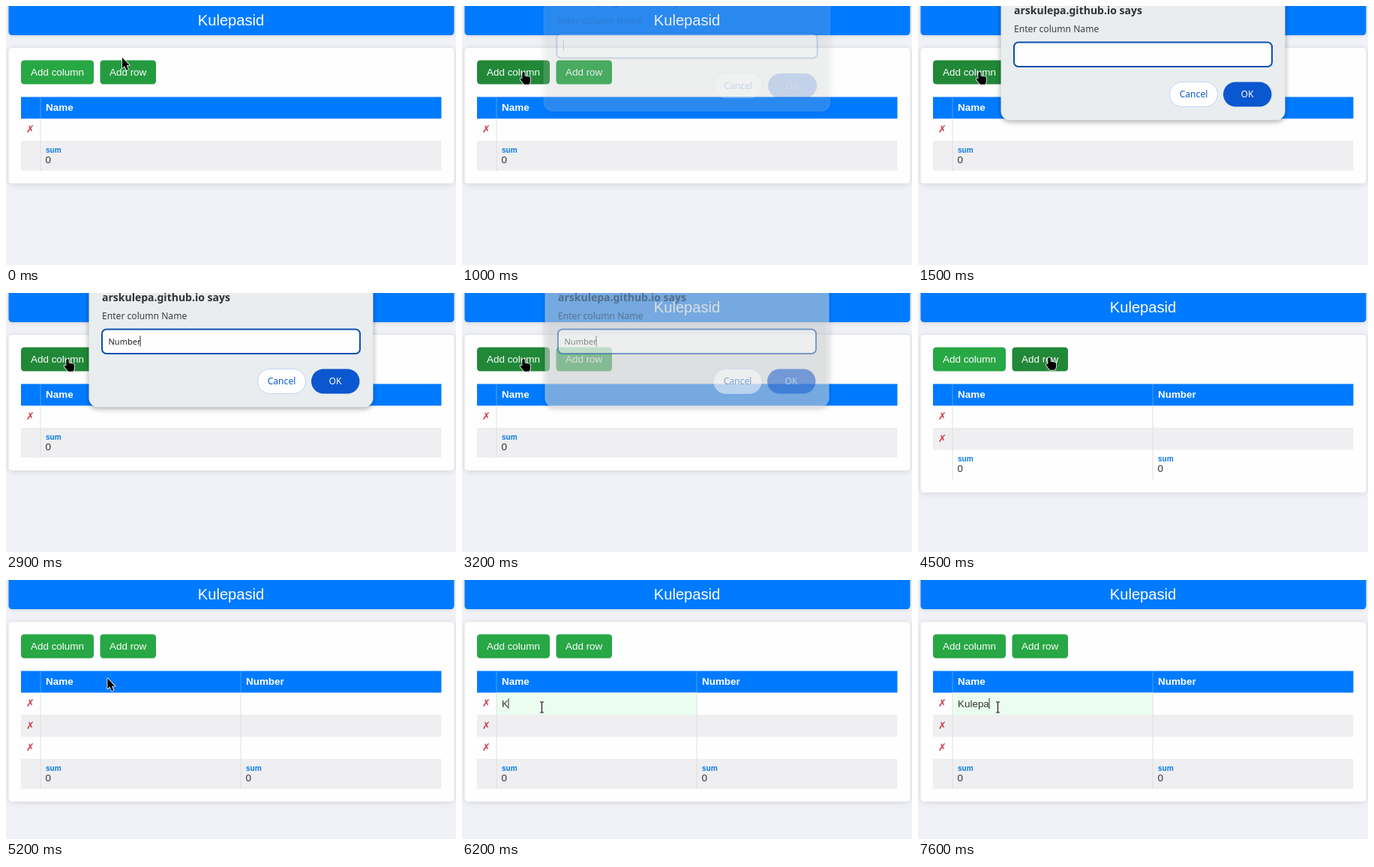
These frames come from a looping animation (600 px wide and 346 px high, 8000 ms). An HTML page with a canvas:

```html
<!DOCTYPE html>
<html lang="en">
<head>
<meta charset="utf-8">
<title>Table editor</title>
<style>
  html, body { margin: 0; width: 100%; height: 100%; overflow: hidden; background: #f1f2f7; }
  canvas { display: block; width: 600px; height: 346px; }
</style>
</head>
<body>
<canvas id="stage"></canvas>
<script>
const W = 600, H = 346, LOOP = 8000, STEP = 100;
const SANS = '"Liberation Sans", Arial, sans-serif';
const UI = '"Noto Sans", sans-serif';
const MARK = '"DejaVu Sans", sans-serif';
const BASE = 13.44;

const canvas = document.getElementById('stage');
const ctx = canvas.getContext('2d');
const dpr = window.devicePixelRatio || 1;
canvas.width = W * dpr;
canvas.height = H * dpr;

const buttons = {
  column: { x: 20, y: 72.5, w: 97, h: 32, label: 'Add column', tx: 33 },
  row: { x: 125.5, y: 72.5, w: 74.5, h: 32, label: 'Add row', tx: 138 }
};

const pathX = [[0, 155], [200, 146], [500, 112], [700, 90], [900, 82],
  [3500, 82], [3700, 108], [4000, 175], [4900, 175], [5100, 150], [5400, 106]];
const pathY = [[0, 69], [200, 82], [500, 95], [700, 94], [900, 88],
  [3500, 88], [3700, 92], [4000, 86], [4900, 86], [5100, 112], [5400, 170]];
const hoverColumn = [[500, 0], [800, 1], [3600, 1], [3900, 0]];
const hoverRow = [[0, 0.4], [200, 0.9], [300, 0.9], [600, 0],
  [3800, 0], [4100, 1], [4900, 1], [5200, 0]];
const dialogFade = [[950, 0], [1230, 1], [3100, 1], [3300, 0]];
const dialogDrop = [[1000, 1], [1300, 0]];

const numberKeys = [2100, 2300, 2500, 2700, 2800, 2900];
const nameKeys = [6200, 7200, 7400, 7600, 7600, 7600];

const arrow = new Path2D('M0 0V14L3.2 11.2L5.5 16.8L8 15.8L5.7 10.3H9.8Z');
const hand = new Path2D('M-1.7 1.2Q0 -1 1.7 1.2V5.6L7.4 6.6Q9.3 7 9.2 9V12.5L7.8 16.8H0.8L-4 10.8Q-4.8 8.6 -2.8 8.6L-1.7 9.6Z');
const beam = new Path2D('M-2.5 -7H2.5M0 -7V7M-2.5 7H2.5');

function key(t, points) {
  if (t <= points[0][0]) return points[0][1];
  for (let i = 1; i < points.length; i++) {
    const [t1, v1] = points[i], [t0, v0] = points[i - 1];
    if (t <= t1) return v0 + (v1 - v0) * (t - t0) / (t1 - t0);
  }
  return points[points.length - 1][1];
}

const typed = (t, word, times) => word.slice(0, times.filter(k => k <= t).length);

function rect(x, y, w, h, color) {
  ctx.fillStyle = color;
  ctx.fillRect(x, y, w, h);
}

function round(x, y, w, h, r, fill, stroke, line) {
  ctx.beginPath();
  ctx.roundRect(x, y, w, h, r);
  ctx.fillStyle = fill;
  ctx.fill();
  if (stroke) {
    ctx.shadowColor = 'transparent';
    ctx.strokeStyle = stroke;
    ctx.lineWidth = line;
    ctx.stroke();
  }
}

function shadowed(blur, dy, color, draw) {
  ctx.save();
  ctx.shadowBlur = blur * dpr;
  ctx.shadowOffsetY = dy * dpr;
  ctx.shadowColor = color;
  draw();
  ctx.restore();
}

// Draws a line of text and returns its width.
function text(str, x, y, size, color, family = SANS, weight = 400, align = 'left') {
  ctx.font = `${weight} ${size}px ${family}`;
  ctx.textAlign = align;
  ctx.fillStyle = color;
  ctx.fillText(str, x, y);
  return ctx.measureText(str).width;
}

function drawButton(b, hover) {
  const mix = (a, z) => Math.round(a + (z - a) * hover);
  round(b.x, b.y, b.w, b.h, 4.2, `rgb(${mix(40, 33)},${mix(167, 136)},${mix(69, 56)})`);
  text(b.label, b.tx, 93, BASE, '#fff');
}

function drawTable(t) {
  const rows = 1 + (t >= 4300) + (t >= 4800);
  const two = t >= 3300;
  const columns = two ? [[53, 'Name'], [320, 'Number']] : [[53, 'Name']];
  const lines = two ? [45.5, 312.5] : [45.5];
  const sumY = 150.5 + rows * 29.5;
  const bottom = sumY + 40;

  shadowed(8, 1, 'rgba(0,0,0,.13)', () => round(3.5, 56, 594, bottom + 17 - 56, 4.5, '#fefefe'));
  drawButton(buttons.column, key(t, hoverColumn));
  drawButton(buttons.row, key(t, hoverRow));

  rect(20, 121.5, 560.5, 29, '#007bff');
  for (let i = 0; i <= rows; i++) {
    const y = 150.5 + i * 29.5;
    if (i % 2) rect(20, y, 560.5, i === rows ? 40 : 29.5, '#efeff1');
    if (i < rows) text('✗', 32.5, y + 18.5, BASE, '#cf3f4e', MARK, 700, 'center');
  }
  if (t >= 6200) rect(46, 150.5, 267, 29.5, '#ebfdee');

  for (const x of lines) {
    rect(x, 121.5, 1, 29, 'rgba(222,226,230,.35)');
    rect(x, 150.5, 1, bottom - 150.5, '#dddfe2');
  }
  for (const [x, label] of columns) {
    text(label, x, 140, BASE, '#fff', SANS, 700);
    text('sum', x, sumY + 15.5, 10.08, '#0a7aec', SANS, 700);
    text('0', x - 0.5, sumY + 29.5, BASE, '#333');
  }

  if (t >= 6200) {
    const w = text(typed(t, 'Kulepa', nameKeys), 53, 169.5, BASE, '#333');
    if (t < 6500 || t >= 7000) rect(Math.round(53 + w) - 0.5, 158, 1, 14, '#333');
  }
}

function drawDialog(t) {
  const alpha = key(t, dialogFade);
  if (t < 1000 || alpha <= 0) return;
  const drop = key(t, dialogDrop);
  ctx.save();
  ctx.globalAlpha = alpha;
  ctx.translate(300, -11.5 * drop);
  ctx.scale(1 + 0.01 * drop, 1);
  ctx.translate(-300, 0);

  shadowed(7, 2, 'rgba(0,0,0,.35)', () => round(110.5, -40, 379, 192.5, 12, '#e9edef'));
  text('arskulepa.github.io says', 128, 11, 14, '#303235', UI, 600);
  text('Enter column Name', 128, 35, 12.1, '#3b3d40', UI);

  round(128, 48.5, 344, 32.5, 6, '#fefefe', '#0b50b0', 2);
  const w = text(typed(t, 'Number', numberKeys), 136.5, 68.5, 11, '#222', UI);
  if (t < 1500 || t >= 2000) rect(Math.round(136.5 + w) - 0.5, 57, 1, 14.5, '#222');

  round(335.5, 101.5, 64, 33, 16.5, '#fefefe', '#c2d5f3', 1);
  text('Cancel', 367.5, 122.3, 12.1, '#0b57d0', UI, 500, 'center');
  round(407, 101.5, 64.5, 33, 16.5, '#0b57d0');
  text('OK', 439, 122.3, 12.1, '#fff', UI, 500, 'center');
  ctx.restore();
}

function drawCursor(t) {
  const x = key(t, pathX), y = key(t, pathY);
  const over = b => x >= b.x && x <= b.x + b.w && y >= b.y && y <= b.y + b.h;
  ctx.save();
  ctx.translate(x, y);
  ctx.lineJoin = 'round';
  if (y > 150 && x > 46) {
    ctx.translate(0.5, 0);
    for (const [color, width] of [['#fff', 2.6], ['#111', 1.2]]) {
      ctx.strokeStyle = color;
      ctx.lineWidth = width;
      ctx.stroke(beam);
    }
  } else {
    const shape = over(buttons.column) || over(buttons.row) ? hand : arrow;
    ctx.strokeStyle = '#fff';
    ctx.lineWidth = 1.6;
    ctx.stroke(shape);
    ctx.fillStyle = '#000';
    ctx.fill(shape);
  }
  ctx.restore();
}

function draw(t) {
  ctx.setTransform(dpr, 0, 0, dpr, 0, 0);
  rect(0, 0, W, H, '#f1f2f7');
  shadowed(5, 1, 'rgba(0,0,0,.12)', () => round(3.5, -20, 594, 59, 4.5, '#007bff'));
  text('Kulepasid', 300, 25.5, 20.1, '#fff', SANS, 400, 'center');
  drawTable(t);
  drawDialog(t);
  drawCursor(t);
}

const start = performance.now();
function tick() {
  const t = (performance.now() - start) % LOOP;
  draw(Math.floor(t / STEP) * STEP);
  requestAnimationFrame(tick);
}
tick();
</script>
</body>
</html>
```
